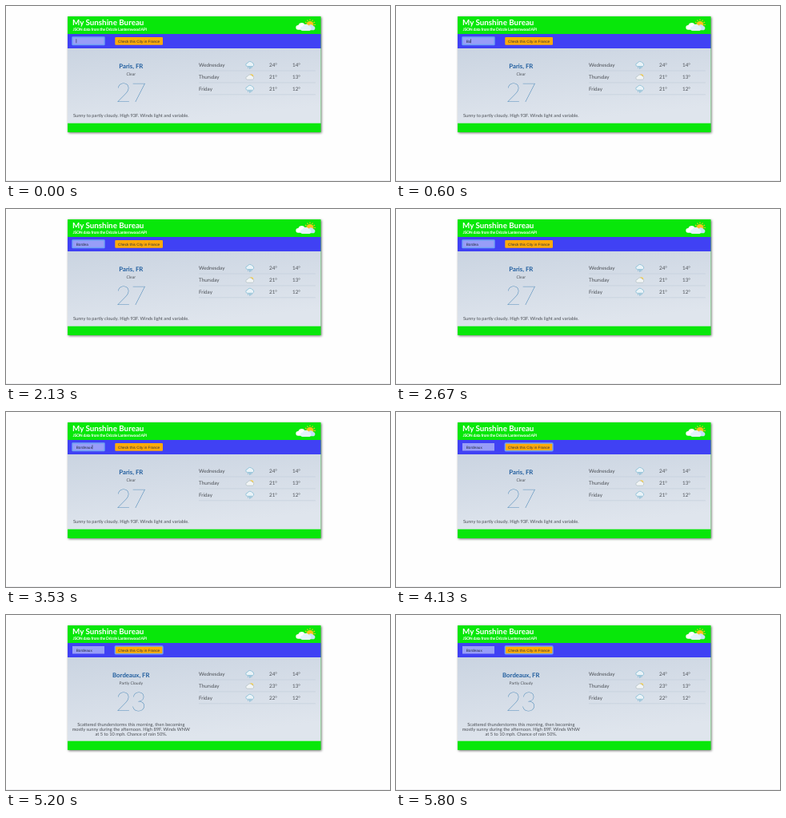
Animation, 480 px wide and 219 px high, one loop 5.87 s. Source, as an HTML page:

```html
<!DOCTYPE html>
<html lang="en">
<head>
<meta charset="utf-8">
<title>Weather card</title>
<style>
  html, body { margin: 0; width: 100%; height: 100%; overflow: hidden; background: #fefefe; }
  svg { display: block; width: 480px; height: 219px; }
  text { font-family: Lato, "Open Sans", sans-serif; fill: #4b4f55; text-rendering: geometricPrecision; }
  .green { fill: #08e70a; }
  .shadow { filter: drop-shadow(1.2px 1.4px 1.4px rgba(0, 0, 0, .55)); }
  .title { font-size: 9.8px; font-weight: 700; fill: #fff; }
  .subtitle { font-size: 5px; font-weight: 700; letter-spacing: -.2px; fill: #fff; }
  .control { font: 4.7px "Liberation Sans", Arial, sans-serif; fill: #222a3c; }
  .middle { text-anchor: middle; }
  .city { font-size: 7.8px; font-weight: 700; fill: #225f9f; }
  .sky { font-size: 5px; }
  .now { font-size: 33px; font-weight: 100; fill: #1f6da9; }
  .report { font-size: 5.7px; }
  .day { font-size: 6.3px; }
  .rule { stroke: #b9c6d5; stroke-width: .5; }
  .glow { fill: none; stroke: #70a2f4; stroke-width: 1.4; }
</style>
</head>
<body>
<svg viewBox="0 0 480 219">
  <defs>
    <linearGradient id="air" x1="0" y1="0" x2=".35" y2="1">
      <stop offset="0" stop-color="#cad4e1"/>
      <stop offset="1" stop-color="#dfe5ed"/>
    </linearGradient>
    <path id="cloud" d="M-3.2 2.2a2 2 0 0 1 .1-4a3.2 3.1 0 0 1 5.8-.5a2.4 2.4 0 0 1 .7 4.5z"/>
    <g id="rain">
      <use href="#cloud" y="-.7" fill="#eaf3f8" stroke="#7db9d2" stroke-width=".7"/>
      <path d="M-2 2.2l-.6 1.5M.3 2l-.9 1.3h1l-.8 1.5M2.3 2.2l-.6 1.5" fill="none" stroke="#4fa5c8" stroke-width=".65"/>
    </g>
    <g id="sunny">
      <circle cx="1.6" cy="-1" r="2.7" fill="#f8cf48"/>
      <use href="#cloud" y="1" fill="#f2f5f6" stroke="#a9b9bd" stroke-width=".6"/>
    </g>
  </defs>

  <path d="M0 218.5H480" stroke="#f1f1f3"/>
  <rect id="card" class="green shadow" x="77" y="13" width="316.5"/>
  <rect id="panel" x="77" y="53" width="316.5" fill="url(#air)"/>
  <rect x="77" y="35" width="316.5" height="18" fill="#4041f4"/>

  <text class="title" x="83" y="24.3">My Sunshine Bureau</text>
  <text class="subtitle" x="83.5" y="31">JSON data from the Drizzle Lanternwood API</text>

  <g id="badge" transform="translate(380 23.5)">
    <g id="rays" stroke="#f6c51d" stroke-width="1.1"></g>
    <circle r="4.5" fill="#fbc21c"/>
    <use href="#cloud" transform="translate(1 4.2) scale(1.15)" fill="#c6e3f5"/>
    <use href="#cloud" transform="translate(-10.2 3.1) scale(1.45)" fill="#fff"/>
    <use href="#cloud" transform="translate(-5 4.5) scale(1.35)" fill="#e4f3fc"/>
  </g>

  <rect x="83" y="39" width="40" height="9.5" fill="#989df8"/>
  <rect id="inputGlow" class="glow" x="83" y="39" width="40" height="9.5" rx=".6"/>
  <text id="typed" class="control" x="87.7" y="45.5"></text>
  <rect id="caret" y="41.3" width=".6" height="5" fill="#1e2440"/>

  <rect x="136.3" y="39" width="59.7" height="9.7" rx="1" fill="#ffab0a"/>
  <rect id="buttonGlow" class="glow" x="136.3" y="39" width="59.7" height="9.7" rx="1"/>
  <text class="control middle" x="166.1" y="45.5">Check this City in France</text>

  <text id="city" class="city middle" x="156.3" y="78.3"></text>
  <text id="sky" class="sky middle" x="156.3" y="86.7"></text>
  <text id="now" class="now middle" x="156.3" y="120.2"></text>
  <g id="report" class="report middle"></g>
  <g id="days" class="day"></g>
</svg>

<script>
const LOOP = 5870, SWITCH = 4200, BLUR = 3870;
const WORD = "Bordeaux";
const KEYS = [200, 470, 800, 1000, 1200, 1400, 2870, 3130];
const CARET_OFF = [[1930, 2270], [2600, 2870], [3600, LOOP]];

const PLACES = [
  { city: "Paris, FR", sky: "Clear", now: 27, bottom: 158, highs: [24, 21, 21],
    report: ["Sunny to partly cloudy. High 93F. Winds light and variable."] },
  { city: "Bordeaux, FR", sky: "Partly Cloudy", now: 23, bottom: 169, highs: [24, 23, 22],
    report: ["Scattered thunderstorms this morning, then becoming",
             "mostly sunny during the afternoon. High 89F. Winds WNW",
             "at 5 to 10 mph. Chance of rain 50%."] }
];
const DAYS = [["Wednesday", "rain", 14], ["Thursday", "sunny", 13], ["Friday", "rain", 12]];

const el = id => document.getElementById(id);
const label = (x, y, s) => `<text x="${x}" y="${y}">${s}</text>`;
const show = (id, on) => el(id).setAttribute("visibility", on ? "visible" : "hidden");

el("rays").innerHTML = Array.from({ length: 12 }, (_, i) =>
  `<path d="M0 -5.2V-7" transform="rotate(${i * 30})"/>`).join("");

function drawPlace(p) {
  for (const id of ["city", "sky", "now"]) el(id).textContent = p[id];
  el("card").setAttribute("height", p.bottom - 13);
  el("panel").setAttribute("height", p.bottom - 11.3 - 53);
  el("report").innerHTML = p.report.map((s, i) => label(156.3, 139 + i * 5.75, s)).join("");
  el("days").innerHTML = DAYS.map(([name, icon, low], i) => {
    const y = 76.4 + i * 14.9;
    return label(241, y, name) + label(329, y, p.highs[i] + "°") + label(358, y, low + "°") +
      `<use href="#${icon}" x="305" y="${y - 2.4}"/>` +
      `<path class="rule" d="M241 ${y + 4.6}H387"/>`;
  }).join("");
}

let shownPlace, shownText;
function render(t) {
  const place = PLACES[t < SWITCH ? 0 : 1];
  if (place !== shownPlace) drawPlace(shownPlace = place);

  const text = WORD.slice(0, KEYS.filter(k => k <= t).length);
  if (text !== shownText) {
    el("typed").textContent = shownText = text;
    el("caret").setAttribute("x", 87.6 + (text ? el("typed").getComputedTextLength() : 0));
  }
  show("caret", !CARET_OFF.some(([a, b]) => t >= a && t < b));
  show("inputGlow", t < BLUR);
  show("buttonGlow", t >= BLUR);
}

const start = performance.now();
function tick() {
  render((performance.now() - start) % LOOP);
  requestAnimationFrame(tick);
}
tick();
</script>
</body>
</html>
```
